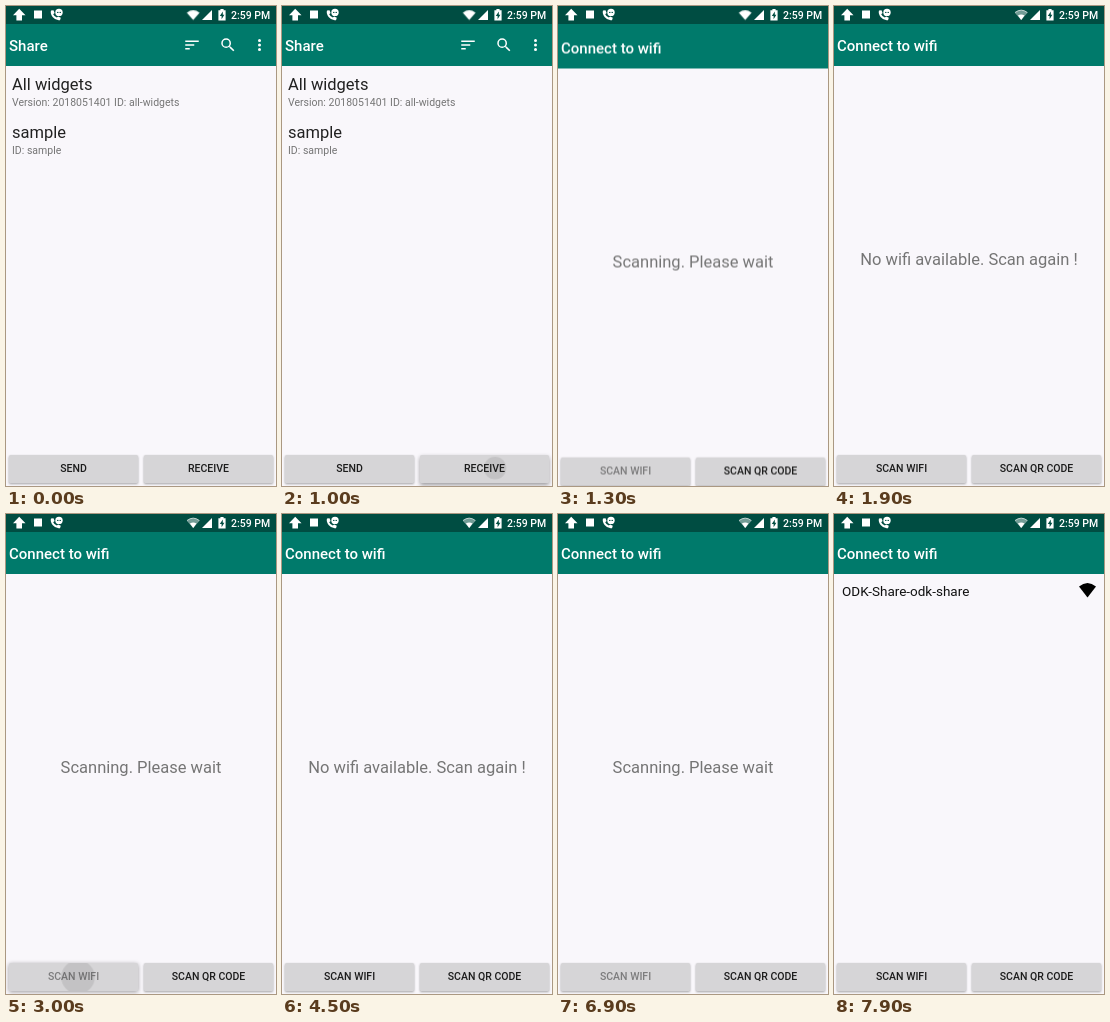
An HTML page for the animation above (8000 ms loop, 270 by 480 pixels).

```html
<!DOCTYPE html>
<html lang="en">
<head>
<meta charset="utf-8">
<title>Share</title>
<style>
html, body { margin: 0; width: 100%; height: 100%; overflow: hidden; background: #f9f7fb; }
svg { display: block; width: 270px; height: 480px; font-family: Roboto, sans-serif; }
.bg { fill: #f9f7fb; }
.bar { fill: #007a6b; }
.title { font-size: 15px; font-weight: 500; fill: #fff; }
.head { font-size: 16.5px; fill: #212121; }
.sub { font-size: 10.5px; fill: #757575; }
.msg { font-size: 16.5px; fill: #757575; text-anchor: middle; }
.row { font-size: 13.5px; fill: #111; }
.clock { font-size: 10.5px; font-weight: 500; fill: #fff; }
.btn rect { fill: #d6d5d7; filter: drop-shadow(0 1px .8px rgba(0,0,0,.35)); }
.btn text { font-size: 10.5px; font-weight: 500; fill: #1c1c1c; text-anchor: middle; }

/* 1% of the loop is 80 ms */
.screen, .ripple, .btn rect, .btn text, .cut { animation: 8s linear infinite; }
.cut, .btn text { animation-timing-function: step-end; }
#connect { animation-name: slide; }
.ripple { fill: #000; transform-box: fill-box; transform-origin: center; }
#receive rect { animation-name: lift; }
#receive .ripple { animation-name: ripple; }
#scan rect { animation-name: scanLift; }
#scan .ripple { animation-name: scanRipple; }
#scan text { animation-name: disable; }
#wait { animation-name: wait; }
#none { animation-name: none-found; }
#found { animation-name: found; }
#online { animation-name: online; }
#offline { animation-name: offline; }

@keyframes slide {
  0%, 13.1% { opacity: 0; transform: translateY(38px); }
  13.75% { opacity: .4; transform: translateY(28px); }
  15% { opacity: .88; transform: translateY(9.7px); }
  15.7% { opacity: 1; }
  16.25% { transform: translateY(2.5px); }
  17.5%, 100% { opacity: 1; transform: none; }
}
@keyframes lift {
  0%, 9.9%, 15%, 100% { filter: drop-shadow(0 1px .8px rgba(0,0,0,.35)); }
  11.2%, 13.75% { filter: drop-shadow(0 2px 2px rgba(0,0,0,.38)); }
}
@keyframes ripple {
  0%, 10.5% { opacity: 0; transform: scale(.2); }
  12.5% { opacity: .09; transform: scale(1); }
  13.75% { opacity: .08; transform: scale(3); }
  15%, 100% { opacity: 0; transform: scale(6); }
}
@keyframes scanLift {
  0%, 34.9%, 38.75%, 78.7%, 83.75%, 100% { filter: drop-shadow(0 1px .8px rgba(0,0,0,.35)); }
  36%, 37.5%, 79.9%, 82.5% { filter: drop-shadow(0 2px 2px rgba(0,0,0,.38)); }
}
@keyframes scanRipple {
  0%, 36%, 80.1% { opacity: 0; transform: scale(.2); }
  37.5%, 82.5% { opacity: .09; transform: scale(1.5); }
  39.5%, 80%, 84.5%, 100% { opacity: 0; transform: scale(6); }
}
@keyframes disable {
  0%, 37.5%, 82.5% { opacity: .48; }
  18.75%, 42.5%, 87.5%, 100% { opacity: 1; }
}
@keyframes wait {
  0%, 37.5%, 82.5% { opacity: 1; }
  18.75%, 42.5%, 87.5%, 100% { opacity: 0; }
}
@keyframes none-found {
  0%, 37.5%, 82.5%, 100% { opacity: 0; }
  18.75%, 42.5% { opacity: 1; }
}
@keyframes found { 0% { opacity: 0; } 87.5%, 100% { opacity: 1; } }
@keyframes online { 0% { opacity: 1; } 20%, 100% { opacity: 0; } }
@keyframes offline { 0% { opacity: 0; } 20%, 100% { opacity: 1; } }
</style>
</head>
<body>
<svg viewBox="0 0 270 480">
  <defs>
    <clipPath id="left"><rect x="3" y="449" width="129" height="28" rx="1.5"/></clipPath>
    <clipPath id="right"><rect x="138" y="449" width="129" height="28" rx="1.5"/></clipPath>
    <path id="wedge" d="M0 3.6Q8.5 -3.6 17 3.6L8.5 14.5Z"/>
  </defs>

  <g id="share">
    <rect class="bg" width="270" height="480"/>
    <rect class="bar" y="18" width="270" height="42"/>
    <text class="title" x="3" y="45">Share</text>
    <g fill="#fff">
      <path transform="translate(177 30) scale(.75)" d="M3 18h6v-2H3zM3 6v2h18V6zM3 13h12v-2H3z"/>
      <path transform="translate(213 30) scale(.75)" d="M15.5 14h-.79l-.28-.27A6.47 6.47 0 0 0 16 9.5 6.5 6.5 0 1 0 9.5 16c1.61 0 3.09-.59 4.23-1.57l.27.28v.79l5 4.99L20.49 19zM9.5 14a4.5 4.5 0 1 1 0-9 4.5 4.5 0 0 1 0 9z"/>
      <circle cx="253.5" cy="34.5" r="1.5"/>
      <circle cx="253.5" cy="39" r="1.5"/>
      <circle cx="253.5" cy="43.5" r="1.5"/>
    </g>
    <text class="head" x="6" y="84">All widgets</text>
    <text class="sub" x="6" y="99.5">Version: 2018051401 ID: all-widgets</text>
    <text class="head" x="6" y="132">sample</text>
    <text class="sub" x="6" y="148">ID: sample</text>
    <g class="btn">
      <rect x="3" y="449" width="129" height="28" rx="1.5"/>
      <text x="67.5" y="466.3">SEND</text>
    </g>
    <g class="btn" id="receive">
      <rect x="138" y="449" width="129" height="28" rx="1.5"/>
      <g clip-path="url(#right)"><circle class="ripple" cx="213" cy="462" r="11"/></g>
      <text x="202.5" y="466.3">RECEIVE</text>
    </g>
  </g>

  <g id="connect" class="screen">
    <rect class="bg" y="18" width="270" height="462"/>
    <rect class="bar" y="18" width="270" height="42"/>
    <text class="title" x="3" y="45">Connect to wifi</text>
    <text class="msg cut" id="wait" x="135" y="258.5">Scanning. Please wait</text>
    <text class="msg cut" id="none" x="135" y="258.5">No wifi available. Scan again !</text>
    <g id="found" class="cut">
      <text class="row" x="8" y="82">ODK-Share-odk-share</text>
      <use href="#wedge" x="245" y="69"/>
    </g>
    <g class="btn" id="scan">
      <rect x="3" y="449" width="129" height="28" rx="1.5"/>
      <g clip-path="url(#left)"><circle class="ripple" cx="72" cy="463" r="11"/></g>
      <text x="67.5" y="466.3">SCAN WIFI</text>
    </g>
    <g class="btn">
      <rect x="138" y="449" width="129" height="28" rx="1.5"/>
      <text x="202.5" y="466.3">SCAN QR CODE</text>
    </g>
  </g>

  <g id="status" fill="#fff">
    <rect width="270" height="18" fill="#004d42"/>
    <path d="M13.2 2.8L19.5 9.2H16V14.6H10.4V9.2H7Z"/>
    <rect x="28" y="4.5" width="8" height="8"/>
    <path d="M45 4.6L47.5 4.2 48.6 7 47.2 8.2Q48.4 10.6 50.8 11.6L52.2 10.4 54.8 11.8 54 14.2Q50 15 46.6 11 44 7.6 45 4.6Z"/>
    <circle cx="53" cy="6.4" r="3.7"/>
    <path d="M51 6.4h4" stroke="#004d42" stroke-width="1" stroke-dasharray="1 .5"/>
    <use href="#wedge" id="online" class="cut" transform="translate(180.8 4.2) scale(.75 .68)"/>
    <g id="offline" class="cut">
      <use href="#wedge" transform="translate(180.8 4.2) scale(.75 .68)" opacity=".45"/>
      <path d="M181 6.5Q187.2 1.8 193.4 6.5" fill="none" stroke="#fff" stroke-width=".7"/>
      <path d="M183.9 9.6Q187.2 7.3 190.5 9.6L187.2 14Z"/>
    </g>
    <path d="M206 4V14H196Z"/>
    <path d="M214.4 3H217.6V4.2H219.6V14.6H212.4V4.2H214.4Z"/>
    <path d="M216.8 5.6L213.8 10H215.6V13.2L218.4 8.8H216.8Z" fill="#004d42"/>
    <text class="clock" x="225" y="13.3">2:59 PM</text>
  </g>
</svg>
</body>
</html>
```
